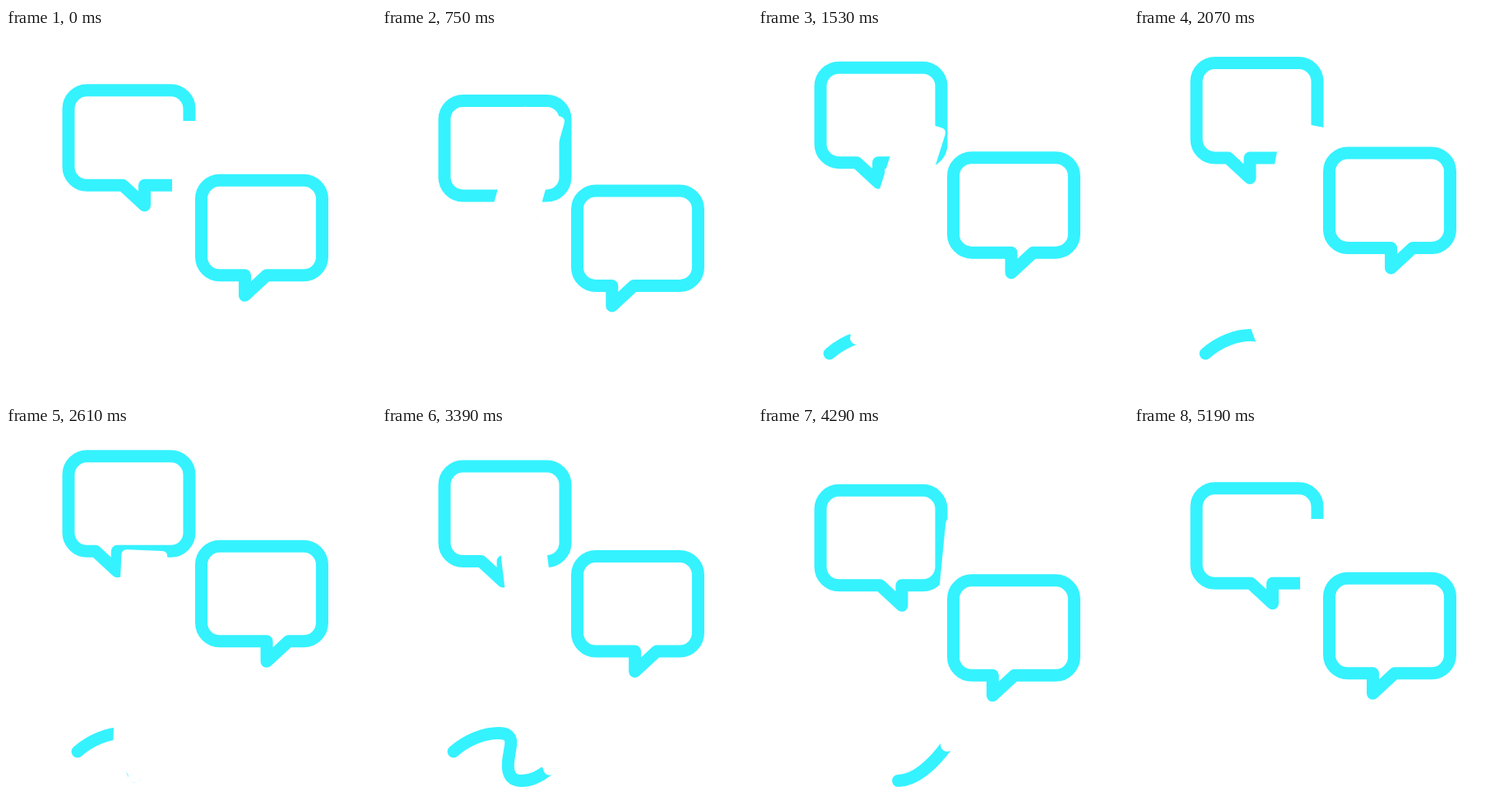
These frames come from a looping animation (450 px wide and 450 px high, 5.4 s). An HTML page:

```html
<!DOCTYPE html>
<html lang="en">
<head>
<meta charset="utf-8">
<title>Chat and pen</title>
<style>
  html, body { margin: 0; width: 100%; height: 100%; overflow: hidden; background: #fff; }
  svg { display: block; width: 100%; height: 100%; }
  .line { fill: none; stroke: #35f2ff; stroke-width: 15; stroke-linecap: round; stroke-linejoin: round; }
</style>
</head>
<body>
<svg viewBox="0 0 450 450">
  <path id="left" class="line"/>
  <path id="squiggle" class="line" d="M87 396C104 381 125 373.5 142 373.5C157 373.5 158 382 156 392C154 404 152 413 154 420C156 428 161 431.5 170 431.5C190 431.5 212 413 230 388"/>
  <g id="pen" fill="#fff">
    <path d="M-28 -268Q-28 -275 -21 -275H21Q28 -275 28 -268V-34L8 -1H-8L-28 -34Z"/>
    <circle r="8"/>
  </g>
  <path id="right" class="line"/>
</svg>
<script>
const LOOP = 5400;
const [left, right, squiggle, pen] =
  ["left", "right", "squiggle", "pen"].map(id => document.getElementById(id));
const total = squiggle.getTotalLength();
const home = squiggle.getPointAtLength(total);
const entry = squiggle.getPointAtLength(0);

const linear = u => u;
const smooth = u => (1 - Math.cos(Math.PI * u)) / 2;
const slowing = u => u ** 0.81;

// Eased progress from 0 to 1 between two times
const ramp = (t, from, to, ease = smooth) =>
  ease(Math.min(1, Math.max(0, (t - from) / (to - from))));

// Bubbles dip, jump up, drift higher while the pen writes, then settle
function bob(t) {
  const dip = ramp(t, 180, 500), jump = ramp(t, 500, 1230);
  const drift = ramp(t, 1230, 2900, linear);
  const fall = ramp(t, 2900, 4140), settle = ramp(t, 4140, 4740);
  return {
    lift: 26 * dip - 50.5 * jump - 17.5 * drift + 45 * fall - 3 * settle,
    sway: -20 * dip + 35 * jump + 14 * drift - 35 * fall + 6 * settle
  };
}

// Lean in, swing back across the stroke, then rock to a stop
const tilt = t => 20 * ramp(t, 180, 1000) - 28.3 * ramp(t, 1000, 3800)
  + 14.3 * ramp(t, 3800, 4220) - 9.3 * ramp(t, 4220, 4740) + 3.3 * ramp(t, 4740, 5190);

// The pen hops to the start of the squiggle, then follows its end
function tipAt(t, drawn) {
  if (drawn > 0) return squiggle.getPointAtLength(drawn);
  const u = ramp(t, 180, 1030);
  return {
    x: home.x + (entry.x - home.x) * u,
    y: home.y + (entry.y - home.y) * u - 40 * Math.sin(Math.PI * u)
  };
}

// Speech bubble; root is where the slanted side of the tail meets the base
function bubble(x, y, tip, root) {
  const r = 22.5, x2 = x + 147, y2 = y + 115.5, low = y2 + 24.5;
  const tail = root < tip
    ? `H${tip}V${low}L${root} ${y2}`
    : `H${root}L${tip} ${low}V${y2}`;
  const arc = (dx, dy) => `a${r} ${r} 0 0 1 ${dx} ${dy}`;
  return `M${x + r} ${y}H${x2 - r}${arc(r, r)}V${y2 - r}${arc(-r, r)}`
    + `${tail}H${x + r}${arc(-r, -r)}V${y + r}${arc(r, -r)}Z`;
}

function draw(t) {
  const { lift, sway } = bob(t), leftTip = 168.5 - 1.25 * sway, rightTip = 290.5 + sway;
  left.setAttribute("d", bubble(76, 75.8 + lift, leftTip, leftTip - 26.5));
  right.setAttribute("d", bubble(237.5, 185.3 + lift, rightTip, rightTip + 26.5));

  const drawn = total * ramp(t, 1200, 4000, slowing);
  const erased = total * ramp(t, 3780, 4640);
  const len = drawn - erased;
  squiggle.style.visibility = len > 0.5 ? "visible" : "hidden";
  squiggle.setAttribute("stroke-dasharray", `${Math.max(len, 0.01)} 999`);
  squiggle.setAttribute("stroke-dashoffset", -erased);

  const { x, y } = tipAt(t, drawn);
  pen.setAttribute("transform", `translate(${x} ${y}) rotate(${tilt(t)})`);
}

const start = performance.now();
function tick() {
  draw((performance.now() - start) % LOOP);
  requestAnimationFrame(tick);
}
draw(0);
requestAnimationFrame(tick);
</script>
</body>
</html>
```
